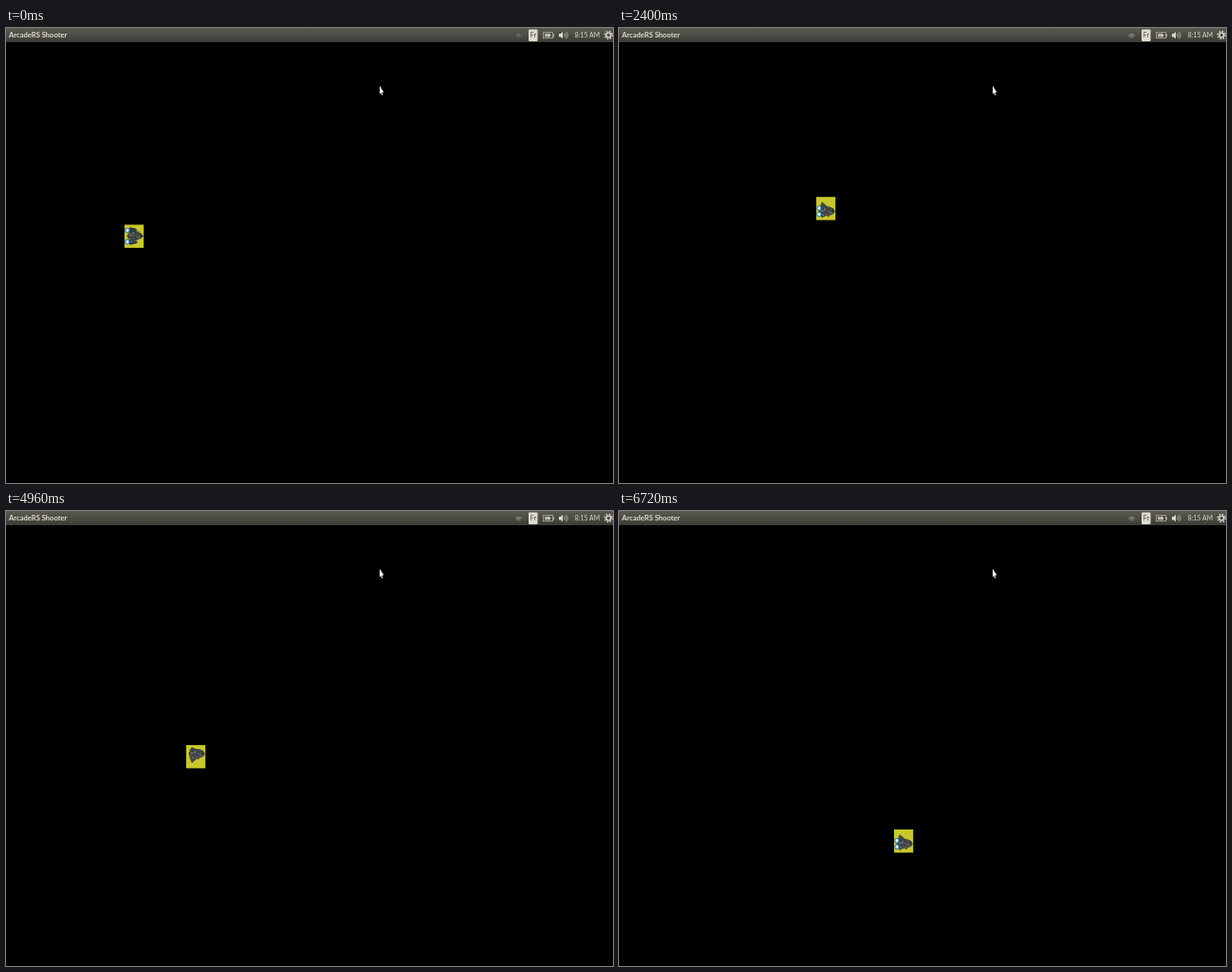
Recreate the animation shown at these times as an HTML page with a canvas. Size 640x480 px, loop 6880 ms.

```html
<!DOCTYPE html>
<html>
<head>
<meta charset="utf-8">
<style>
html, body { margin: 0; width: 100%; height: 100%; overflow: hidden; background: #000; }
canvas { display: block; }
</style>
</head>
<body>
<canvas id="stage" width="640" height="480"></canvas>
<script>
const ctx = document.getElementById('stage').getContext('2d');
const LOOP = 6880, STEP = 160;
const INK = '#dfdbd2', DIM = '#b3afa6';
const METAL = ['#85878a', '#6e6252', '#22272a', '#566267'];

// Turning points of the flight; straight, even motion between them
const turns = [
  { at: 640, x: 125, y: 207.5 }, { at: 1760, x: 175, y: 122 },
  { at: 1920, x: 177, y: 137 }, { at: 3040, x: 249.3, y: 233.2 },
  { at: 3360, x: 249, y: 269 }, { at: 4000, x: 198.7, y: 235 },
  { at: 4160, x: 189, y: 222 }, { at: 4640, x: 219, y: 261 },
  { at: 4960, x: 190, y: 247 }, { at: 5120, x: 181, y: 235 },
  { at: 5440, x: 216, y: 240 }, { at: 6720, x: 290, y: 336 }
];

function seeded(seed) {
  return () => (seed = seed * 16807 % 2147483647) / 2147483647;
}

function rect(color, x, y, w, h) {
  ctx.fillStyle = color;
  ctx.fillRect(x, y, w, h);
}

function triangle(color, x1, y1, x2, y2, x3, y3) {
  ctx.fillStyle = color;
  ctx.beginPath();
  ctx.moveTo(x1, y1);
  ctx.lineTo(x2, y2);
  ctx.lineTo(x3, y3);
  ctx.fill();
}

function oval(color, x, y, rx, ry = rx) {
  ctx.fillStyle = color;
  ctx.beginPath();
  ctx.ellipse(x, y, rx, ry, 0, 0, 7);
  ctx.fill();
}

function arc(color, width, x, y, r, from = 0, to = 2 * Math.PI) {
  ctx.strokeStyle = color;
  ctx.lineWidth = width;
  ctx.beginPath();
  ctx.arc(x, y, r, from, to);
  ctx.stroke();
}

function text(str, x, font, color = INK) {
  ctx.font = font + ' Lato, sans-serif';
  ctx.fillStyle = color;
  ctx.fillText(str, x, 10.4);
}

function drawBar(t) {
  const shade = ctx.createLinearGradient(0, 0, 0, 15);
  shade.addColorStop(0, '#5b5a52');
  shade.addColorStop(1, '#3c3b37');
  rect(shade, 0, 0, 640, 15);
  text('ArcadeRS Shooter', 3, 'bold 7.6px');
  text('8:15 AM', 599.8, '6.8px');

  const signal = t < 2400 ? '#87857d' : DIM;
  for (let r = 0.5; r < 6; r += 1.9) arc(signal, 0.9, 540.5, 11, r, -2.4, -0.74);

  ctx.fillStyle = INK;
  ctx.beginPath();
  ctx.roundRect(551, 1.5, 9.5, 12.5, 1);
  ctx.fill();
  text('Fr', 552.8, '7px', '#45443f');

  // Battery
  ctx.strokeStyle = DIM;
  ctx.lineWidth = 0.8;
  ctx.strokeRect(566.5, 4.7, 10, 6);
  rect(DIM, 577, 6.3, 1, 3);
  rect(DIM, 568, 6, 3, 3.4);
  triangle(INK, 573, 5, 570, 8.2, 573, 8.2);
  triangle(INK, 571.5, 10.6, 575, 7.2, 572, 7.2);

  // Speaker
  rect(INK, 583, 6, 2, 3.4);
  triangle(INK, 583.5, 7.7, 587, 3.8, 587, 11.6);
  for (let r = 2; r < 6; r += 1.7) arc(DIM, 0.8, 586.8, 7.7, r, -0.8, 0.8);

  // Gear
  arc(INK, 1.4, 635.3, 7.5, 2.4);
  ctx.setLineDash([Math.PI / 2]);
  arc(INK, 1.4, 635.3, 7.5, 4);
  ctx.setLineDash([]);
}

// bank: -1 climbing, 0 level, 1 diving
function drawShip(x, y, bank, flames) {
  const random = seeded(71);
  const mid = 12 + 3 * bank;
  const flameGap = bank ? 3.3 : 6;
  ctx.save();
  ctx.translate(x, y);
  rect('#c8c82b', 0, 0, 20.2, 24.4);
  ctx.translate(0, mid);
  for (const side of [-1, 1]) {
    const span = 10 - (side === bank ? 3 : 0);
    triangle('#454742', 3, side * 3, 6, side * span, 14, side * 3);
    if (!bank) oval('#343a3d', 8, side * 6, 5, 2.8);
  }
  oval('#3d4243', 11, 0, 8.5, bank ? 5 : 4);
  triangle('#3d4243', 13, -4, 20, 0, 13, 4);
  for (let i = 0; i < 34; i++) {
    const angle = random() * 2 * Math.PI, reach = Math.sqrt(random());
    const px = 11 + 7 * reach * Math.cos(angle), py = (bank ? 5 : 7) * reach * Math.sin(angle);
    rect(METAL[i % METAL.length], px, py, 1.6, 1);
  }
  if (flames) {
    for (const side of [-1, 1]) {
      oval('#2f83bd', 2.8, side * flameGap, 2.5, 2.8);
      oval('#e2f4fa', 3, side * flameGap, 1.5, 1.8);
    }
  }
  ctx.restore();
}

function fly(t) {
  const i = turns.findIndex(turn => turn.at >= t);
  const to = turns[i], from = turns[i - 1] || to;
  const k = i ? (t - from.at) / (to.at - from.at) : 0;
  const mix = axis => from[axis] + (to[axis] - from[axis]) * k;
  drawShip(mix('x'), mix('y'), Math.sign(to.y - from.y), to.x >= from.x - 1);
}

function drawCursor() {
  triangle('#fff', 394, 61, 394, 69.6, 398.2, 67.4);
  triangle('#fff', 395, 66, 396.2, 71, 397.4, 70.4);
}

function draw(now) {
  const t = Math.floor(now % LOOP / STEP) * STEP;
  rect('#000', 0, 0, 640, 480);
  drawBar(t);
  fly(t);
  drawCursor();
  requestAnimationFrame(draw);
}

requestAnimationFrame(draw);
</script>
</body>
</html>
```
